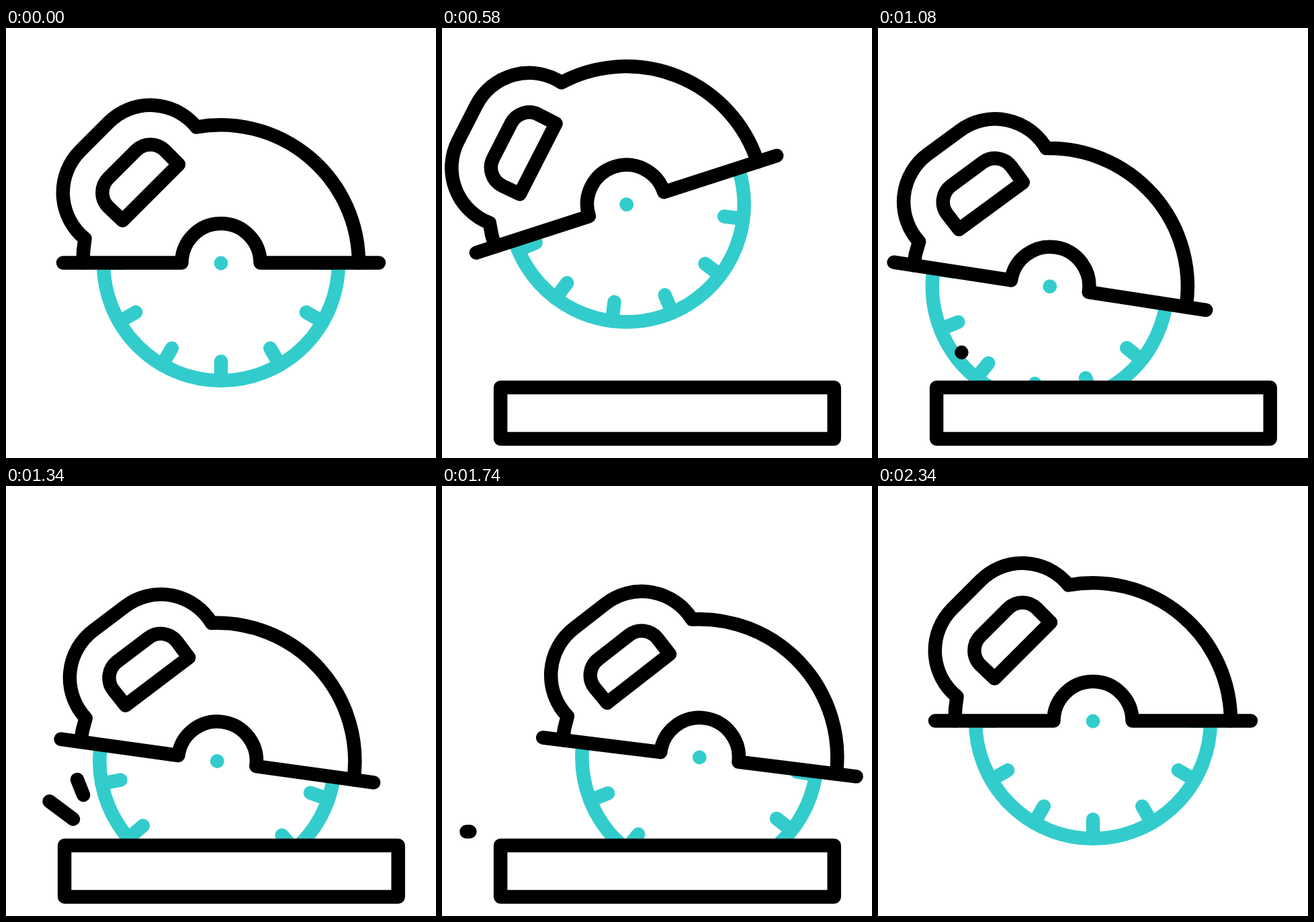
Recreate the animation shown at these times as an HTML page. Size 640 by 640 pixels, loop 2.4 s.

```html
<!DOCTYPE html>
<html lang="en">
<head>
<meta charset="utf-8">
<title>Circular saw</title>
<style>
  html, body { margin: 0; width: 100%; height: 100%; overflow: hidden; background: #fff; }
  svg { display: block; width: 100vw; height: 100vh; }
  .ink, .blade { fill: none; stroke-width: 20.5; stroke-linecap: round; stroke-linejoin: round; }
  .ink { stroke: #000; }
  .blade { stroke: #3cc; }
</style>
</head>
<body>
<svg viewBox="0 0 640 640">
  <defs>
    <clipPath id="below"><rect x="100" y="349.5" width="440" height="220"/></clipPath>
  </defs>
  <g id="saw">
    <g clip-path="url(#below)">
      <g id="disc" class="blade">
        <circle cx="320" cy="349.8" r="175"/>
      </g>
    </g>
    <circle cx="320" cy="350" r="10.4" fill="#3cc"/>
    <g class="ink">
      <path d="M114.5 349.5A205.5 205.5 0 0 1 117.5 313.5A88 88 0 0 1 110.6 182.8L152.8 140.6A88 88 0 0 1 283.5 147.5A205.5 205.5 0 0 1 525 349.5"/>
      <path d="M257 203L236.4 182.3A30.2 30.2 0 0 0 193.6 182.3L152.3 223.6A30.2 30.2 0 0 0 152.3 266.4L173.5 286.5Z"/>
      <path d="M85 349.5H261.5A58.5 58.5 0 0 1 378.5 349.5H555"/>
    </g>
  </g>
  <g id="sparks" class="ink"></g>
  <rect id="slab" class="ink" x="87.1" y="535.1" width="496.6" height="76.5" style="fill:#fff"/>
</svg>
<script>
const NS = "http://www.w3.org/2000/svg";
const LOOP = 2400, STEP = 20;
const $ = id => document.getElementById(id);

function make(tag, attrs, parent) {
  const el = document.createElementNS(NS, tag);
  for (const k in attrs) el.setAttribute(k, attrs[k]);
  if (parent) parent.appendChild(el);
  return el;
}

// Symmetric cubic-bezier(.41, 0, .59, 1)
function ease(u) {
  if (u <= 0) return 0;
  if (u >= 1) return 1;
  let lo = 0, hi = 1, s = u;
  for (let i = 0; i < 30; i++) {
    const q = 1 - s;
    const x = 3 * q * q * s * 0.41 + 3 * q * s * s * 0.59 + s * s * s;
    if (x < u) lo = s; else hi = s;
    s = (lo + hi) / 2;
  }
  return s * s * (3 - 2 * s);
}

const span = (t, from, to) => ease((t - from) / (to - from));

// keys: [time, value] pairs, eased between neighbours
function track(keys, t) {
  let i = 0;
  while (i < keys.length - 2 && t >= keys[i + 1][0]) i++;
  const [t0, a] = keys[i], [t1, b] = keys[i + 1];
  return a + (b - a) * span(t, t0, t1);
}

const tilt = [[0, 0], [548, -18.1], [1080, 8.7], [1600, 7.1], [1720, 7.1], [2175, 0]];
const slide = [[0, -607], [540, 0], [1980, 0], [2376, 580]];

// Stretches of the saw's route, as offsets from its rest position
const route = [
  [0, 560, "M0 0C0 0 -32 -93.5 -45 -87.5"],
  [560, 1100, "M-45 -87.5C-59 -82 -81 11 -64 35"],
  [1100, 1590, "M-64 35C-45 66 46 64.5 63.2 54.2"],
  [1720, 2160, "M63.2 54.2C66.2 52.2 0 0 0 0"]
].map(([from, to, d]) => {
  const path = make("path", { d });
  return { from, to, path, len: path.getTotalLength() };
});

function place(t) {
  let leg = route[0];
  for (const r of route) if (t >= r.from) leg = r;
  return leg.path.getPointAtLength(leg.len * span(t, leg.from, leg.to));
}

for (let a = 0; a < 360; a += 30) {
  make("path", { d: "M320 496.3V524.8", transform: `rotate(${a} 320 349.8)` }, $("disc"));
}

const sparks = [
  [1070, 124.4, 482.9, 106, 437],
  [1153, 103.2, 498.1, 56.8, 463.5],
  [1392, 94, 513, 36.5, 514.5]
].map(([start, x0, y0, x1, y1]) => ({ start, x0, y0, x1, y1, el: make("line", {}, $("sparks")) }));

function drawSpark({ start, x0, y0, x1, y1, el }, t) {
  const age = t - start;
  const tip = span(age, 0, 260), tail = span(age, 140, 400);
  el.style.display = tip > tail ? "" : "none";
  const put = (n, f) => {
    el.setAttribute("x" + n, x0 + (x1 - x0) * f);
    el.setAttribute("y" + n, y0 + (y1 - y0) * f);
  };
  put(1, tail);
  put(2, tip);
}

function draw(t) {
  const p = place(t);
  $("saw").setAttribute("transform", `translate(${p.x} ${p.y}) rotate(${track(tilt, t)} 320 350)`);
  $("disc").setAttribute("transform", `rotate(${360 * span(t, 0, 2160)} 320 349.8)`);
  $("slab").setAttribute("transform", `translate(${track(slide, t)} 0)`);
  sparks.forEach(s => drawSpark(s, t));
}

let begin = null;
function tick(now) {
  if (begin === null) begin = now;
  const t = Math.max(0, now - begin) % LOOP;
  draw(Math.floor(t / STEP) * STEP);
  requestAnimationFrame(tick);
}
draw(0);
requestAnimationFrame(tick);
</script>
</body>
</html>
```
